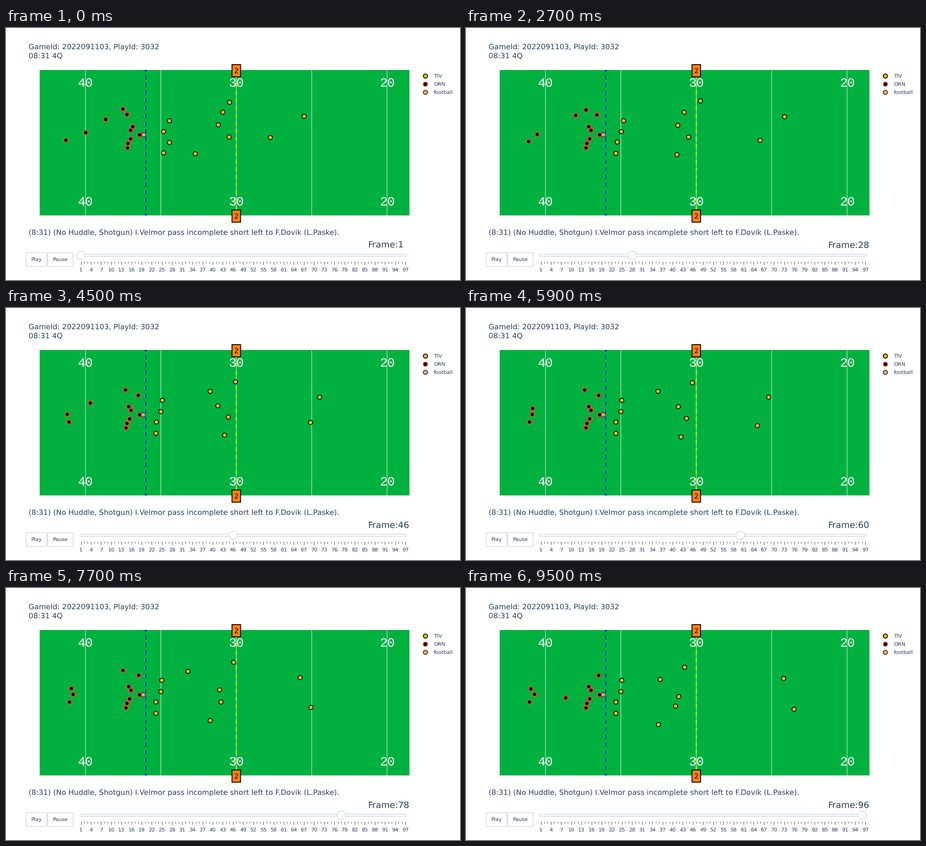
A matplotlib script for the animation above (9.6 s loop, 1004 by 558 pixels).

```python
import numpy as np
import matplotlib.pyplot as plt
from matplotlib.animation import FuncAnimation
from matplotlib.patches import Circle, FancyBboxPatch, Rectangle

WIDTH, HEIGHT, DPI = 1004, 558, 64
PX = 72 / DPI  # points per pixel
STEPS = 96
TIME = np.arange(STEPS)

INK, BORDER = "#2a3f5f", "#bec8d9"
LEFT, RIGHT, TOP, BOTTOM = 74.5, 892.3, 93, 415
YARD_40, YARD = 175.75, 33.35
SLIDER_X, SLIDER_STEP = 165.5, 7.475

plt.rcParams.update({"font.family": "DejaVu Sans", "text.hinting": "none"})

fig = plt.figure(figsize=(WIDTH / DPI, HEIGHT / DPI), dpi=DPI, facecolor="white")
ax = fig.add_axes([0, 0, 1, 1])
ax.set(xlim=(0, WIDTH), ylim=(HEIGHT, 0))
ax.axis("off")


def yard_x(yard):
    return YARD_40 + (40 - yard) * YARD


def label(x, y, text, size, ha="left", color=INK, **kw):
    return ax.text(x, y, text, size=size * PX, ha=ha, va="baseline", color=color, **kw)


def vline(x, top, bottom, color, width, **kw):
    ax.plot([x, x], [bottom, top], color=color, lw=width * PX,
            solid_capstyle="butt", dash_capstyle="butt", **kw)


def rounded_box(x0, y0, x1, y1, fill):
    ax.add_patch(FancyBboxPatch((x0, y0), x1 - x0, y1 - y0, fc=fill, ec=BORDER, lw=PX,
                                boxstyle="round,pad=0,rounding_size=2", zorder=2))


def dots(x, y, fill, edge, zorder):
    return ax.scatter(x, y, s=(9.4 * PX) ** 2, c=fill, edgecolors=edge,
                      linewidths=1.9 * PX, zorder=zorder)


def glide(keys, values):
    """Monotone cubic through the key values, sampled at every step."""
    slope = np.diff(values) / np.diff(keys)
    a, b = slope[:-1], slope[1:]
    same = a * b > 0
    inner = np.where(same, 2 * a * b / np.where(same, a + b, 1), 0)
    m = np.r_[slope[0], inner, slope[-1]]
    i = np.clip(np.searchsorted(keys, TIME, side="right") - 1, 0, len(keys) - 2)
    h = keys[i + 1] - keys[i]
    u = (TIME - keys[i]) / h
    ease = u * u * (3 - 2 * u)
    return (values[i] + (values[i + 1] - values[i]) * ease
            + h * u * (1 - u) * (m[i] * (1 - u) - m[i + 1] * u))


class Team:
    def __init__(self, name, fill, edge, legend_y, zorder):
        self.paths = []
        dots([927], [legend_y], fill, edge, zorder)
        label(946, legend_y + 4, name, 11.4)
        self.marks = dots([], [], fill, edge, zorder)

    def run(self, *stops):
        """Follow a smooth path through (step, x, y) stops."""
        keys, xs, ys = np.array(stops, float).T
        self.paths.append(np.column_stack([glide(keys, xs), glide(keys, ys)]))

    def settle(self, x, y, dx=0, dy=0, pace=12):
        """Drift by (dx, dy), slowing down exponentially."""
        done = 1 - np.exp(-TIME / pace)
        self.paths.append(np.column_stack([x + dx * done, y + dy * done]))

    def show(self, step):
        self.marks.set_offsets([path[step] for path in self.paths])


# Field
ax.add_patch(Rectangle((LEFT, TOP), RIGHT - LEFT, BOTTOM - TOP,
                       fc="#00b140", lw=0, snap=False))
for yard in range(40, 19, -5):
    vline(yard_x(yard), TOP, BOTTOM, "white", 0.94, snap=False, zorder=2)
for yard in (40, 30, 20):
    for y in (131, 394):
        label(yard_x(yard), y, str(yard), 28.3, "center", "white",
              family="Liberation Mono", zorder=3)

for yard, color in ((36, "blue"), (30, "yellow")):
    vline(yard_x(yard), TOP, BOTTOM, color, 1.884, ls=(2.1, (4.5, 4.5)),
          snap=False, zorder=4)
clip = Rectangle((LEFT, TOP), RIGHT - LEFT, BOTTOM - TOP, transform=ax.transData)
for y in (TOP, BOTTOM):
    end = ax.add_patch(Circle((yard_x(36), y), 2.8, fc="blue", lw=0, zorder=4))
    end.set_clip_path(clip)
for y in (81, 403):
    ax.add_patch(Rectangle((yard_x(30) - 9.5, y), 19, 27, fc="#ff7f0e", ec="black",
                           lw=1.9 * PX, snap=False, zorder=8))
    label(yard_x(30), y + 18.6, "2", 14.5, "center", "black", zorder=9)

# Defense: four linemen creep up while the backs shift around
defense = Team("TIV", "#ffb612", "#101820", 106.3, 5)
defense.settle(360.5, 205.2, -17, -0.8, pace=20)
defense.settle(348, 229.3, -6)
defense.settle(360.5, 252.8, -29.5, -1.3)
defense.settle(348, 275.5, -17.5, 1.8, pace=8)
defense.run((0, 493.5, 164.3), (27, 517.5, 161.3), (59, 499.5, 164.8),
            (77, 503, 164.3), (95, 482.5, 174.8))
defense.run((0, 479, 185.8), (15, 493, 187.8), (45, 450.5, 183.8),
            (77, 401.5, 184.3), (95, 428.5, 202.3))
defense.run((0, 468.5, 214), (45, 467.5, 215.8), (77, 472, 225.3), (95, 470, 240.3))
defense.run((0, 493, 241.3), (45, 491, 241.3), (95, 462.5, 261.3))
defense.run((0, 583.5, 242.3), (45, 673, 253.3), (59, 643.5, 260.3), (95, 725, 267.8))
defense.run((0, 658.5, 194.8), (31, 705, 196.3), (77, 650, 198.3), (95, 701.5, 200.3))
defense.run((0, 417.5, 277.8), (45, 483, 281.3), (95, 425, 301.8))

# Offense: the line holds its stance while four players go in motion
offense = Team("ORN", "#000000", "#fb4f14", 124.3, 6)
offense.settle(131.5, 248.3, 8.5, 3.5, pace=18)
offense.settle(266.5, 191.3, 27, 1.3, pace=16)
offense.settle(279.5, 217.8, -9, pace=8)
offense.settle(274.5, 226.3, 2)
offense.settle(294.5, 235.8)
offense.settle(274.5, 244.8, -2)
offense.settle(269, 254.8, -2, pace=5)
offense.settle(268, 265, -3)
offense.run((0, 175.5, 231.3), (27, 156.5, 234.8), (42, 134.5, 234.8),
            (59, 145.5, 234.8), (95, 150.5, 234.8))
offense.run((0, 220, 201.8), (27, 241.5, 192.8), (59, 146.5, 221.8), (95, 143, 222.8))
offense.run((0, 258, 178.8), (27, 265, 180.8), (77, 257.5, 181.8), (95, 219.5, 243.3))

ball = Team("football", "#cbb67c", "#663831", 141.8, 7)
ball.settle(303.5, 235.8, -0.8)

# Captions
label(50, 47, "GameId: 2022091103, PlayId: 3032", 16.3)
label(50, 67, "08:31 4Q", 16.3)
label(50, 458, "(8:31) (No Huddle, Shotgun) I.Velmor pass incomplete short left "
      "to F.Dovik (L.Paske).", 16.3)
counter = label(800.5, 487, "", 19.4)

# Controls
for x0, x1, text in ((44.5, 90.5, "Play"), (92.5, 148.5, "Pause")):
    rounded_box(x0, 497.5, x1, 528.5, "white")
    label((x0 + x1) / 2, 516, text, 11.4, "center")
rounded_box(163.5, 500.5, 885.5, 505.5, "#f8fafc")
for k in range(97):
    x = SLIDER_X + SLIDER_STEP * k
    major = k % 3 == 0
    vline(x, 517, 523.5 if major else 521, "#333333", 0.94)
    if major:
        label(x, 538.6, str(k + 1), 11.4, "center")
handle = ax.add_patch(Circle((SLIDER_X, 503.3), 9.4, fc="white", ec=BORDER,
                             lw=PX, zorder=3))


def update(step):
    for group in (defense, offense, ball):
        group.show(step)
    counter.set_text(f"Frame:{step + 1}")
    handle.center = (SLIDER_X + SLIDER_STEP * step, 503.3)


anim = FuncAnimation(fig, update, frames=STEPS, interval=100,
                     init_func=lambda: update(0), repeat=True, repeat_delay=0)
plt.show()
```
